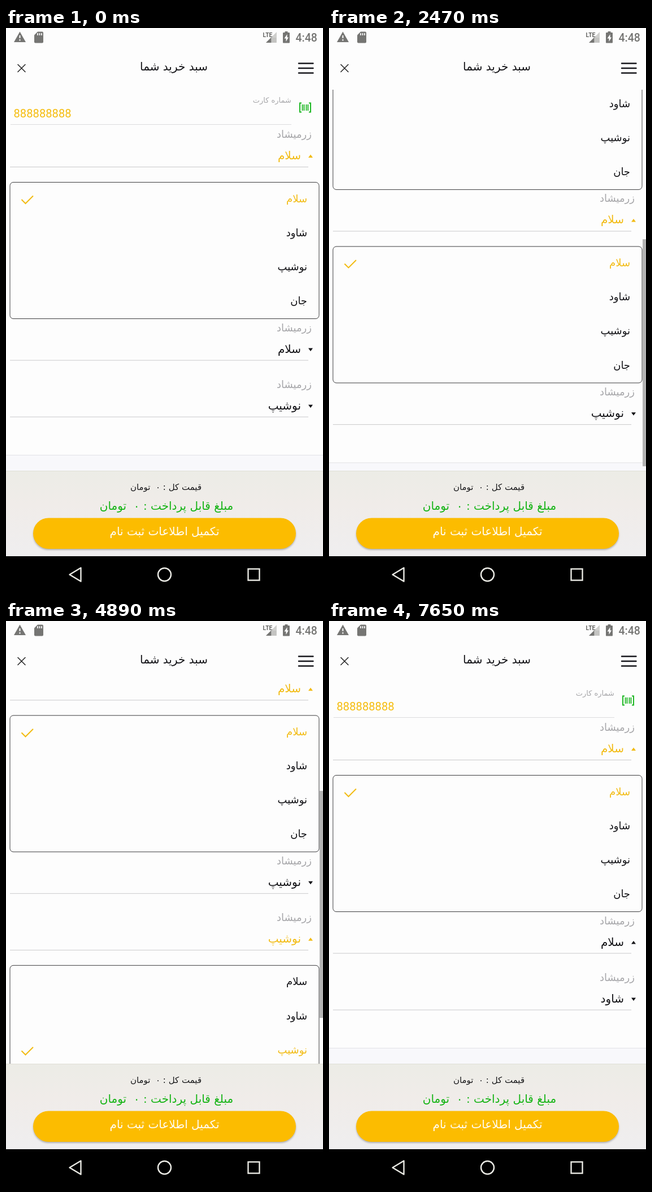
Animation of 561 by 998 pixels, one loop 9.29 s. Source, as an HTML page:

```html
<!DOCTYPE html>
<html lang="fa">
<head>
<meta charset="utf-8">
<title>سبد خرید شما</title>
<style>
html, body { margin: 0; width: 100%; height: 100%; overflow: hidden; background: #fdfdfd; }
svg { display: block; width: 100vw; height: 100vh; }
text { font-family: "DejaVu Sans", sans-serif; white-space: pre; }
.fa { direction: rtl; }
.mid { text-anchor: middle; }
.latin { font-family: Roboto, sans-serif; }
.label { font-size: 18px; fill: #a6a6a9; }
.value { font-size: 20px; }
.option { font-size: 18px; }
.rule { stroke: #c9c9cb; }
.line { fill: none; stroke-width: 2; }
</style>
</head>
<body>
<svg viewBox="0 0 561 998" preserveAspectRatio="none">
  <defs>
    <clipPath id="view"><rect y="109" width="561" height="673"/></clipPath>
    <linearGradient id="foot" x2="0" y2="1">
      <stop offset="0" stop-color="#ecece6"/>
      <stop offset=".4" stop-color="#f0ece9"/>
      <stop offset="1" stop-color="#efeeef"/>
    </linearGradient>
    <filter id="soft" x="-5%" y="-20%" width="110%" height="150%"><feGaussianBlur stdDeviation="1.5"/></filter>
  </defs>
  <rect width="561" height="998" fill="#fdfdfd"/>

  <g clip-path="url(#view)">
    <g id="page">
      <text class="fa" x="505" y="132" font-size="13" fill="#a6a6a9">شماره کارت</text>
      <text class="latin" x="13.5" y="158" font-size="20.2" fill="#f5bd10">888888888</text>
      <path d="M8 170.5H505" stroke="#dcdcde"/>
      <g stroke="#1fb825" fill="none">
        <path d="M523 132.500h-3v16h3M536 132.500h3v16h-3" stroke-width="2"/>
        <path d="M524.500 135v11M527.500 135v11M531.500 135v11M534.500 135v11" stroke-width="1.800"/>
      </g>
      <g id="sections"></g>
      <g id="end">
        <rect y="754" width="561" height="60" fill="#f8f8fb"/>
        <path d="M0 754.500H561" stroke="#e3e3e6"/>
      </g>
    </g>
    <rect id="thumb" x="555" width="6" fill="#b2b2b2"/>
  </g>

  <g id="status" fill="#757573">
    <path d="M24.500 6.500L35 25H14Z"/>
    <path d="M24.500 13v5M24.500 20v2.500" stroke="#fdfdfd" stroke-width="2"/>
    <path d="M56 6.500h8q2 0 2 2v16q0 2-2 2H52q-2 0-2-2V12.500Z"/>
    <path d="M56 9v4M59.500 9v4M63 9v4" stroke="#fdfdfd" stroke-width="1.700"/>
    <path d="M479 7V26H460Z" fill="#cfcfcd"/>
    <path d="M469.500 16.500V26H460Z"/>
    <path d="M469 17H478.500V26H469Z" fill="#b9b9b7" opacity=".5"/>
    <text class="latin" x="454.500" y="16" font-size="10.500" font-weight="500" fill="#4f4f4d">LTE</text>
    <path d="M493.500 6h5v2h2.500q1 0 1 1v16.500q0 1-1 1H491q-1 0-1-1V9q0-1 1-1h2.500Z"/>
    <path d="M497.500 11L492.500 18.500H495.500V24L500 16.500H497.500Z" fill="#fdfdfd"/>
    <text class="latin" x="512.500" y="24" font-size="19.500" font-weight="500">4:48</text>
  </g>
  <path d="M21 64.500L34 77.500M34 64.500L21 77.500" stroke="#222" stroke-width="1.500" stroke-linecap="round"/>
  <path d="M518 62.500H543.500M518 71H543.500M518 79.500H543.500" stroke="#17171c" stroke-width="2.400" stroke-linecap="round"/>
  <text class="fa mid" x="297" y="75" font-size="20" fill="#101014">سبد خرید شما</text>

  <rect y="782" width="561" height="151" fill="url(#foot)"/>
  <path d="M0 782.500H561" stroke="#e0dfd6"/>
  <text class="fa mid" x="283" y="816" font-size="15" fill="#18181a">قیمت کل : ۰  تومان</text>
  <text class="fa mid" x="284" y="851" font-size="20" fill="#12b312">مبلغ قابل پرداخت : ۰  تومان</text>
  <rect x="48" y="868" width="465" height="54" rx="27" fill="#8d8d8d" opacity=".65" filter="url(#soft)"/>
  <rect x="48" y="865.500" width="465" height="54.500" rx="27.200" fill="#fcbc00"/>
  <text class="fa mid" x="280.500" y="896" font-size="20" fill="#fffdf6">تکمیل اطلاعات ثبت نام</text>

  <rect y="933" width="561" height="65" fill="#000"/>
  <g fill="none" stroke="#eaeae4" stroke-width="2.400">
    <path d="M112.500 965.500L132.500 953.500V977.500Z" stroke-linejoin="round"/>
    <circle cx="280.500" cy="965.500" r="11.500"/>
    <rect x="428.500" y="955.500" width="20" height="20"/>
  </g>
</svg>
<script>
const LOOP = 9290, PANEL = 241.5, GOLD = "#f2bb12", INK = "#101014";
const OPTIONS = ["سلام", "شاود", "نوشیپ", "جان"];
const TITLE = "زرمیشاد";
const $ = id => document.getElementById(id);

function add(parent, tag, attrs, text) {
  const el = document.createElementNS("http://www.w3.org/2000/svg", tag);
  for (const k in attrs) el.setAttribute(k, attrs[k]);
  if (text) el.textContent = text;
  return parent.appendChild(el);
}
const set = (el, k, v) => el.setAttribute(k, v);
const ramp = (t, a, b) => Math.min(1, Math.max(0, (t - a) / (b - a)));
const smooth = x => x < .5 ? 2 * x * x : 1 - 2 * (1 - x) * (1 - x);
const within = (t, a, b) => t >= a && t < b;

// y = 0 is the middle of the grey title
function makeSection(last) {
  const root = add($("sections"), "g", {});
  add(root, "text", { class: "fa label", x: 541, y: 6 }, TITLE);
  const head = add(root, "g", {});
  const value = add(head, "text", { class: "fa value", x: 522, y: 44 });
  const arrow = add(head, "path", {});
  add(head, "path", { class: "rule", d: "M7 57.500H535" });
  const panel = add(root, "g", {});
  add(panel, "rect", { x: 7, y: 84.5, width: 547, height: 241, rx: 6, fill: "none", stroke: "#3c3c3e" });
  if (last) add(panel, "path", { d: "M13 325.500H548", stroke: "#fdfdfd", "stroke-width": 2 });
  const rows = OPTIONS.map((name, i) =>
    add(panel, "text", { class: "fa option", x: 533, y: 119.5 + 60.2 * i }, name));
  const check = add(panel, "path", { class: "line", d: "M27.500 115l7 7L48 108.500", stroke: GOLD });

  return (y, s) => {
    const color = s.open ? GOLD : INK;
    set(root, "transform", `translate(0 ${y})`);
    set(head, "opacity", s.fade);
    value.textContent = OPTIONS[s.pick];
    set(value, "fill", color);
    set(arrow, "d", s.up ? "M535 41h8l-4-5.500Z" : "M535 36h8l-4 5.500Z");
    set(arrow, "fill", color);
    set(panel, "display", s.open ? "inline" : "none");
    rows.forEach((row, i) => {
      set(row, "fill", i === s.pick ? GOLD : INK);
      set(row, "opacity", i === s.tapped ? s.tapFade : 1);
    });
    set(check, "transform", `translate(0 ${60.2 * s.pick})`);
    return y + (s.open ? 341.5 : 100);
  };
}
const draw = [false, false, true].map(makeSection);

// Touch feedback: dims on press, returns on release
const touch = (t, down, up) =>
  1 - .8 * smooth(ramp(t, down, down + 150)) + .8 * smooth(ramp(t, up, up + 250));
const glide = (t, a, b) => 1 - Math.pow(1 - ramp(t, a, b), 2.1);
const shown = (t, a, b, c) => ramp(t, a, a + 60) * (1 - ramp(t, b, c));

function render(t) {
  const second = {
    open: within(t, 1300, 3160) || within(t, 6860, 7650),
    up: within(t, 1500, 3380) || t >= 7050,
    pick: within(t, 3160, 7650) ? 2 : 0,
    fade: t < 4000 ? touch(t, 1000, 1240) : touch(t, 6580, 6820),
    tapped: t < 4000 ? 2 : 0,
    tapFade: 1 - .8 * smooth(t < 4000 ? ramp(t, 2980, 3130) : ramp(t, 7590, 7740))
  };
  const third = {
    open: within(t, 4340, 5740),
    up: within(t, 4550, 5920),
    pick: t < 5740 ? 2 : 1,
    fade: touch(t, 4000, 4295),
    tapped: 1,
    tapFade: 1 - .8 * smooth(ramp(t, 5580, 5730))
  };
  let scroll = 0;
  if (within(t, 2020, 3160)) scroll = 241 * glide(t, 2020, 2620);
  if (within(t, 4730, 5740)) scroll = 241 * glide(t, 4730, 5400);

  set($("page"), "transform", `translate(0 ${-scroll})`);
  let y = draw[0](188, { open: true, up: true, pick: 0, fade: 1 });
  y = draw[1](y, second);
  y = draw[2](y, third);
  set($("end"), "transform", `translate(0 ${y - 729.5})`);

  const tall = second.open || third.open;
  set($("thumb"), "y", tall ? 237 + scroll * .597 : 272);
  set($("thumb"), "height", tall ? 401 : 510);
  set($("thumb"), "opacity", t < 4600 ? shown(t, 2020, 4110, 4420) : shown(t, 4730, 6290, 6590));
}

function tick(now) {
  render(now % LOOP);
  requestAnimationFrame(tick);
}
render(0);
requestAnimationFrame(tick);
</script>
</body>
</html>
```
